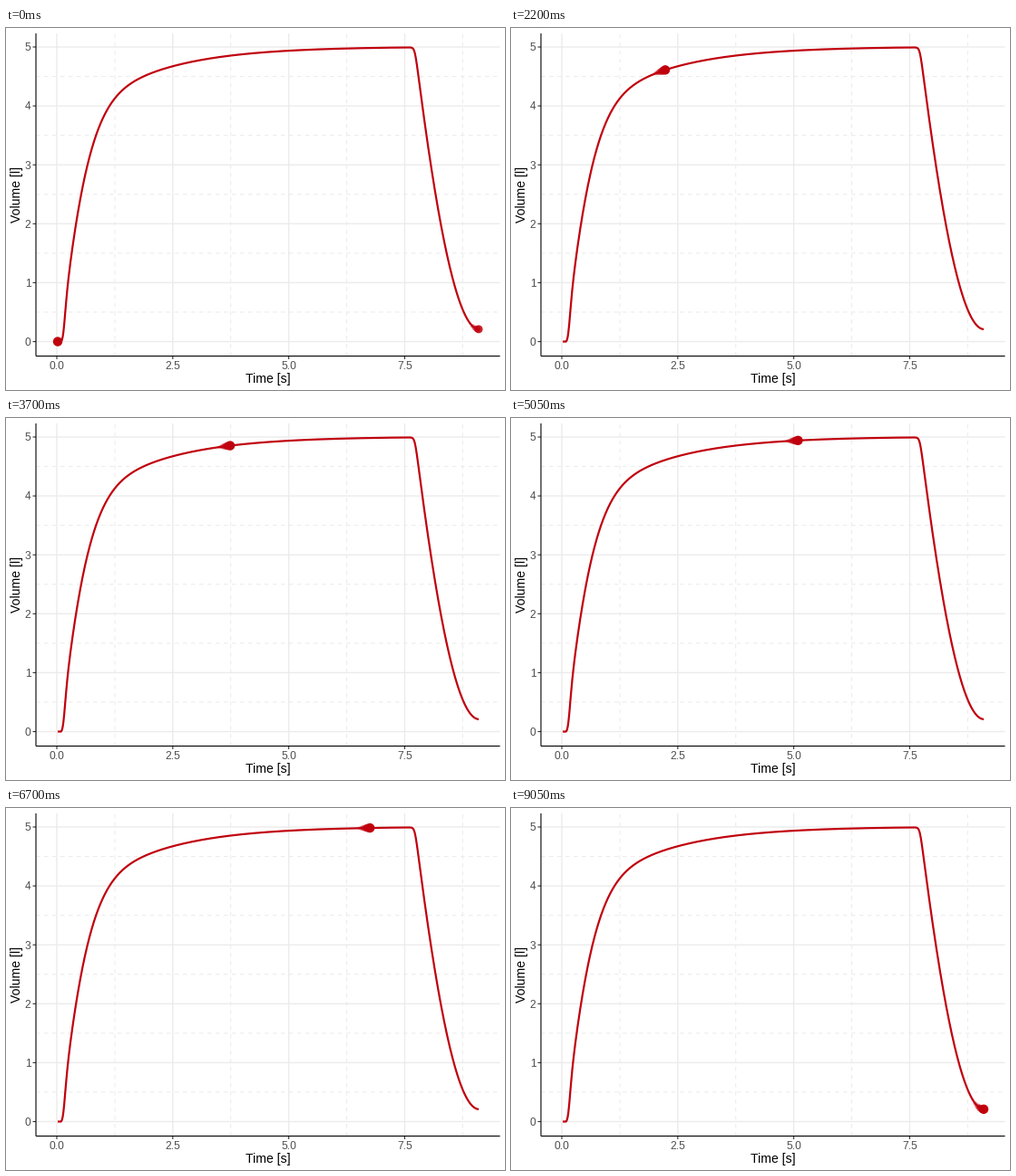
A matplotlib script that plays this animation: 550 by 400 pixels, repeating every 9.1 s.

```python
import numpy as np
import matplotlib.pyplot as plt
from matplotlib.animation import FuncAnimation

W, H, DPI = 550, 400, 100
PX = 72 / DPI                      # points per pixel
FRAMES, STEP_MS = 182, 50
TRAIL = 7                          # head plus fading dots
RADIUS = 5.2
RED, GRID = "#c0000d", "#ebebeb"

LEFT, RIGHT, TOP, BOTTOM = 33, 544.5, 6, 362.5
T_START, T_END = 0.02, 9.095       # seconds of breathing


def x_px(t):
    return 56 + 51.13 * t


def y_px(v):
    return 346.5 - 65.1 * v


def volume(t):
    """Fast and slow filling with a soft onset, then a quadratic emptying."""
    fill = 5.007 - 1.588 * np.exp(-t / 1.6) - np.exp(1.415 - 1.717 * t - 0.736 * t**2)
    onset = 1 / (1 + np.exp((0.15 - t) / 0.027))
    u = 9.1 - t
    empty = 0.21 + 2.72 * u**2 / (1 + 0.045 * u**2)
    soft = 0.14                    # rounds the shoulder between the phases
    both = -soft * np.logaddexp(-fill * onset / soft, -empty / soft)
    return np.maximum(both, 0)


def head_time(n):
    return np.minimum(T_START + 0.05023 * n, T_END)


plt.rcParams["font.family"] = "Liberation Sans"
fig = plt.figure(figsize=(W / DPI, H / DPI), dpi=DPI, facecolor="white")
ax = fig.add_axes([0, 0, 1, 1])
ax.set_xlim(0, W)
ax.set_ylim(H, 0)
ax.axis("off")


def seg(xs, ys, color, width, **kw):
    ax.plot(xs, ys, color=color, lw=width * PX, snap=False,
            solid_capstyle="butt", dash_capstyle="butt", **kw)


def label(x, y, s, size, color, **kw):
    ax.text(x, y, s, fontsize=size * PX, color=color, **kw)


# Minor grid, dashed
dash = dict(linestyle=(0, (4.5, 4.5)))
for k in range(4):
    x = x_px(1.25 + 2.5 * k)
    seg([x, x], [BOTTOM, TOP], GRID, 1, **dash)
for k in range(5):
    y = y_px(k + 0.5)
    seg([LEFT, RIGHT], [y, y], GRID, 1, **dash)

# Major grid, ticks and tick labels
for k in range(4):
    x = x_px(2.5 * k)
    seg([x, x], [BOTTOM, TOP], GRID, 1.35)
    seg([x, x], [BOTTOM, BOTTOM + 3.5], "#333333", 1.1)
    label(x, 377.3, f"{2.5 * k:.1f}", 12, "#4d4d4d", ha="center", va="baseline")
for v in range(6):
    y = y_px(v)
    seg([LEFT, RIGHT], [y, y], GRID, 1.35)
    seg([LEFT - 3.5, LEFT], [y, y], "#333333", 1.1)
    label(27.5, y + 4.4, str(v), 12, "#4d4d4d", ha="right", va="baseline")

# Axis lines and titles
seg([LEFT, LEFT], [TOP, BOTTOM], "black", 1.1)
seg([LEFT, RIGHT], [BOTTOM, BOTTOM], "black", 1.1)
label(288.7, 392, "Time [s]", 14, "black", ha="center", va="baseline")
label(19, 184.3, "Volume [l]", 14, "black", ha="right", va="center", rotation=90)

t = np.linspace(T_START, T_END, 1500)
ax.plot(x_px(t), y_px(volume(t)), color=RED, lw=2.2 * PX,
        solid_capstyle="butt", solid_joinstyle="round")

# Oldest dot first so that the head lies on top
age = np.arange(TRAIL - 1, -1, -1)
fade = 1 - age / TRAIL
dots = ax.scatter(np.zeros(TRAIL), np.zeros(TRAIL), s=(2 * RADIUS * fade * PX) ** 2,
                  c=[RED] * TRAIL, alpha=fade, linewidths=0, zorder=5)


def draw(n):
    when = head_time((n - age) % FRAMES)
    dots.set_offsets(np.column_stack([x_px(when), y_px(volume(when))]))
    return [dots]


anim = FuncAnimation(fig, draw, frames=FRAMES, interval=STEP_MS,
                     init_func=lambda: draw(0), repeat=True, repeat_delay=0)
plt.show()
```
